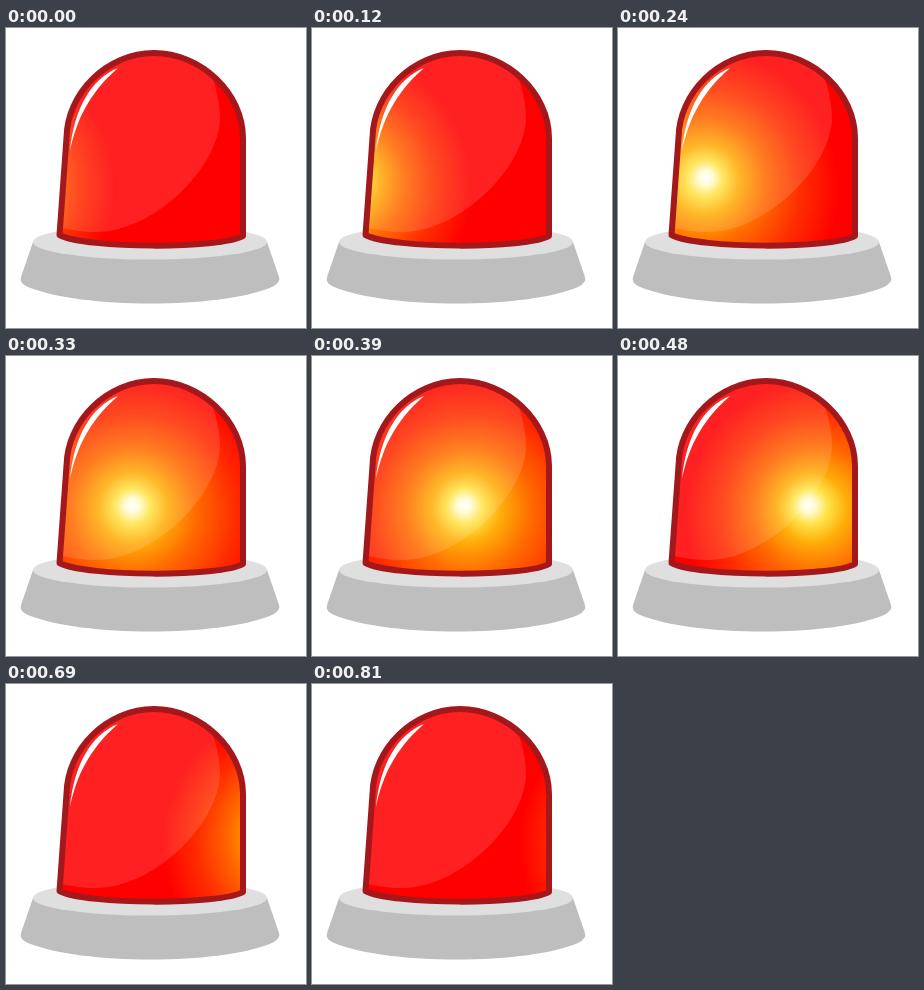
Write an HTML page with a canvas that moves like this. It is 300 px wide and 300 px high and loops after 0.84 s.

```html
<!DOCTYPE html>
<html lang="en">
<head>
<meta charset="utf-8">
<title>Beacon</title>
<style>
html, body { margin: 0; width: 100%; height: 100%; overflow: hidden; background: #fff; }
canvas { display: block; width: 300px; height: 300px; }
</style>
</head>
<body>
<canvas id="stage" width="300" height="300"></canvas>
<script>
const ctx = document.getElementById('stage').getContext('2d');
const LOOP = 840, STEP = 30;

const dome = new Path2D('M53.5 207 L60.5 110 C61 65 101 25 148 25 C195 25 237 65 237 110 L237 208 C215 221 80 221 53.5 207Z');
const sheen = new Path2D('M40 190 L40 20 L190 20 C206 42 214 66 214 93 C210 143 146 204 90 204 Q70 204 52 199Z');
const highlight = new Path2D('M112 40 C86 50 68 80 64 123 C70 94 82 66 112 40Z');
const base = new Path2D('M27 214 L15 249 Q13 255 22 259 C75 281 215 281 266 259 Q275 254 273 249 L261 214Z');
const rim = new Path2D();
rim.ellipse(144, 214, 117, 17.5, 0, 0, Math.PI * 2);

const glowStops = [
  [0, '#fff'], [0.05, '#fffbd2'], [0.13, '#ffe246'], [0.25, '#ffac0a'],
  [0.45, '#ff6a00'], [0.72, '#ff2c00'], [1, '#f00']
];

function fill(path, color) {
  ctx.fillStyle = color;
  ctx.fill(path);
}

function glowAt(time) {
  const x = 88 + 0.424 * (time - 240);
  const lean = Math.max(-18, Math.min(18, (time - 300) * 0.12));
  const glow = ctx.createRadialGradient(x, 149, 0, x + lean, 161, 140);
  for (const [offset, color] of glowStops) glow.addColorStop(offset, color);
  return glow;
}

function draw(time) {
  ctx.fillStyle = '#fff';
  ctx.fillRect(0, 0, 300, 300);
  fill(base, '#bebebe');
  fill(rim, '#dfdfdf');

  ctx.save();
  ctx.clip(dome);
  fill(dome, glowAt(time));
  fill(sheen, 'rgba(255, 255, 255, 0.13)');
  fill(highlight, '#fff');
  ctx.restore();

  ctx.strokeStyle = '#a4181c';
  ctx.lineWidth = 6;
  ctx.lineJoin = 'round';
  ctx.stroke(dome);
}

const start = performance.now();
function tick() {
  const elapsed = (performance.now() - start) % LOOP;
  draw(Math.floor(elapsed / STEP) * STEP);
  requestAnimationFrame(tick);
}
tick();
</script>
</body>
</html>
```
